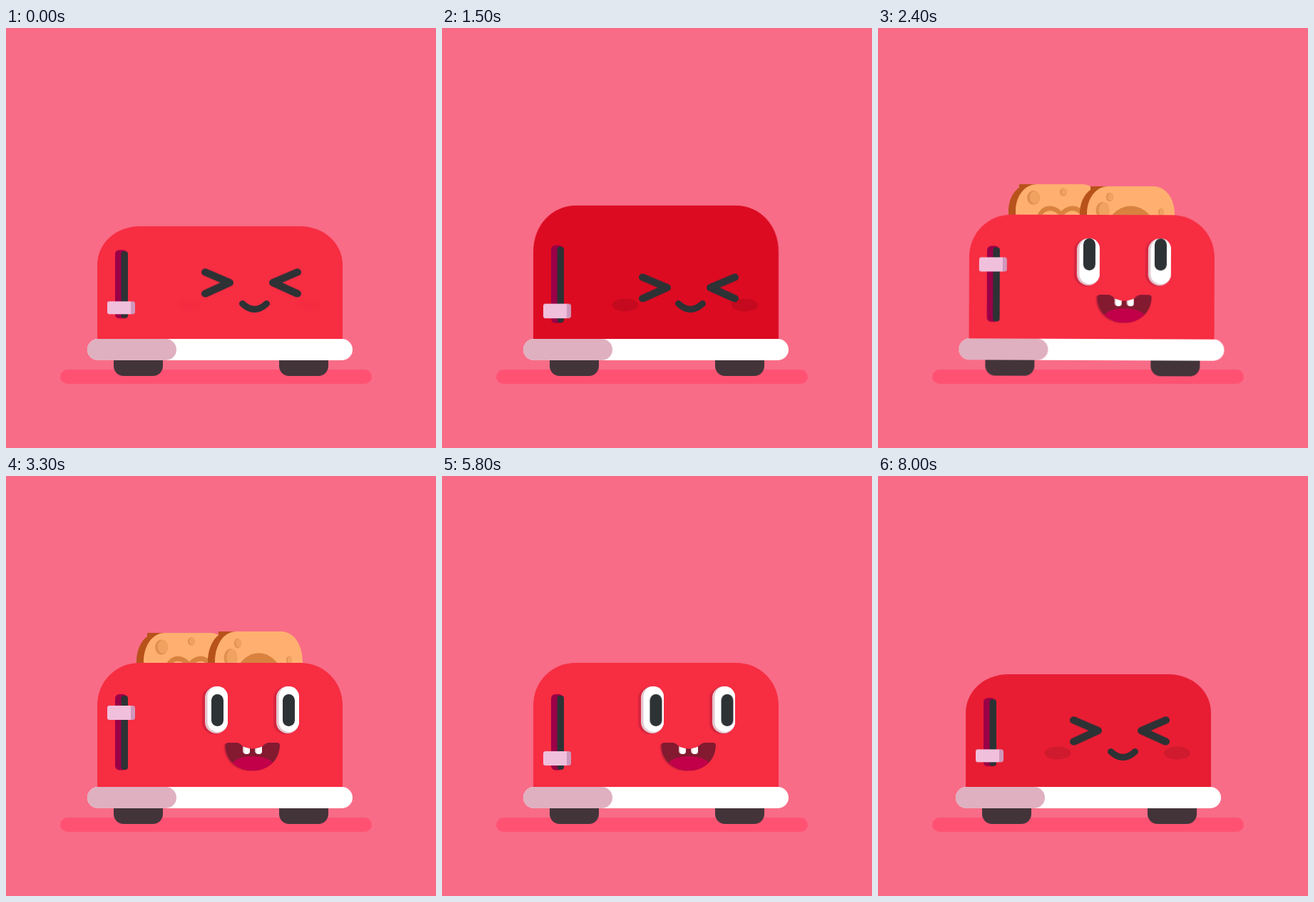
Recreate the animation shown at these times as an HTML page without scripts. Size 603 by 589 pixels, loop 8100 ms.

```html
<!DOCTYPE html>
<html lang="en">
<head>
<meta charset="utf-8">
<title>Happy toaster</title>
<style>
  html, body { margin: 0; width: 100%; height: 100%; overflow: hidden; background: #f86c87; }
  svg { display: block; }

  /* one shared clock: 100 ms = 1.2346 % */
  .rock, .shake, .body, .slot, .lever, .blush, .open, .shut, .squint, .pupils, .back, .front {
    animation: 8.1s linear infinite;
  }
  .ink { fill: #2d3235; }
  .line { fill: none; stroke: #2d3235; stroke-linecap: round; stroke-linejoin: round; }
  .hole { fill: #e08f4e; }
  .pit { fill: #f0a260; }

  .rock { animation-name: rock; transform-origin: 300px 436px; }
  @keyframes rock {
    0%, 20.98% { transform: none; }
    22.22% { transform: translate(1px, -5px) rotate(-1deg); }
    24.69% { transform: translate(2px, -8px) rotate(-2deg); }
    27.16% { transform: translate(0, -1px) rotate(-.3deg); }
    28.4% { transform: translate(-1px, 0) rotate(.8deg); }
    30.86% { transform: translate(0, 0) rotate(-.4deg); }
    33.33%, 100% { transform: none; }
  }

  .shake { animation-name: shake; animation-timing-function: step-end; }
  @keyframes shake {
    0% { transform: none; }
    1.23%, 6.17% { transform: translateX(5px); }
    2.46%, 7.4%, 9.87% { transform: translateX(-2px); }
    3.7%, 11.11% { transform: translateX(4px); }
    4.93% { transform: translateX(-1px); }
    8.64% { transform: translateX(3px); }
    12.34%, 14.81% { transform: translateX(-2px); }
    13.58%, 16.04% { transform: translateX(3px); }
    17.28%, 92.59% { transform: none; }
    93.82%, 96.29% { transform: translateX(5px); }
    95.06% { transform: translateX(-4px); }
    97.53% { transform: translateX(3px); }
    98.76%, 100% { transform: translateX(-5px); }
  }

  .body { animation-name: squash, heat; transform-origin: 300px 436px; fill: #f72d42; }
  @keyframes squash {
    0%, 11.11% { transform: scaleY(.908); animation-timing-function: ease-in-out; }
    18.52%, 19.75% { transform: scaleY(1.075); }
    22.22%, 81.48% { transform: none; }
    82.72% { transform: scaleY(1.034); }
    83.95% { transform: scaleY(1.017); animation-timing-function: ease-out; }
    91.36%, 100% { transform: scaleY(.908); }
  }
  @keyframes heat {
    0% { fill: #f72d42; }
    12.35%, 20.99% { fill: #dc0b22; }
    23.46%, 92.59% { fill: #f72d42; }
    98.77%, 100% { fill: #e81d33; }
  }

  .slot { animation-name: slot; transform-origin: 162px 359.5px; }
  @keyframes slot {
    0%, 11.11% { transform: scaleY(.9); animation-timing-function: ease-in-out; }
    18.52%, 19.75% { transform: scaleY(1.025); }
    22.22%, 81.48% { transform: none; }
    82.72% { transform: scaleY(1.05); }
    83.95% { transform: scaleY(1.025); animation-timing-function: ease-out; }
    91.36%, 100% { transform: scaleY(.9); }
  }

  .lever { animation-name: lever; }
  @keyframes lever {
    0%, 19.75% { transform: translateY(64px); }
    22.22%, 23.46% { transform: translateY(-3px); }
    25.93%, 45.68% { transform: none; animation-timing-function: ease-in-out; }
    56.79% { transform: translateY(62px); }
    59.26%, 100% { transform: translateY(64px); }
  }

  .blush { animation-name: blush; opacity: 0; }
  @keyframes blush {
    0% { opacity: 0; }
    4.94%, 22.22% { opacity: .1; }
    24.69% { opacity: .07; }
    29.63%, 92.59% { opacity: 0; }
    97.53%, 100% { opacity: .1; }
  }

  .open { animation-name: open; animation-timing-function: step-end; }
  .shut { animation-name: shut; animation-timing-function: step-end; }
  @keyframes open {
    0%, 81.48%, 100% { visibility: hidden; }
    20.98% { visibility: visible; }
  }
  @keyframes shut {
    0%, 81.48%, 100% { visibility: visible; }
    20.98% { visibility: hidden; }
  }

  .squint { animation-name: squint; transform-origin: 349px 344.5px; }
  @keyframes squint {
    0%, 11.11% { transform: translate(-5px, 13px) scaleY(.94); }
    18.52%, 20.98% { transform: translate(-3px, 20px) scaleY(.93); }
    81.48% { transform: translate(2px, -12px); }
    83.95% { transform: none; animation-timing-function: ease-out; }
    91.36%, 100% { transform: translate(-5px, 13px) scaleY(.94); }
  }

  .pupils { animation-name: look; }
  @keyframes look {
    0%, 24.69% { transform: none; }
    28.4%, 37.04% { transform: translateY(-11px); animation-timing-function: ease-in-out; }
    40.74%, 61.73% { transform: none; animation-timing-function: ease-in-out; }
    66.67%, 70.37% { transform: translateX(7px); }
    72.84%, 100% { transform: none; }
  }

  .back { animation-name: back; }
  @keyframes back {
    0%, 20.98% { transform: translateY(295px) scaleY(1.18); }
    22.22% { transform: translateY(160px) scaleY(1.15); }
    23.46% { transform: translateY(113px) scaleY(1.06); animation-timing-function: ease-out; }
    24.69% { transform: translateY(94px); animation-timing-function: ease-in; }
    29.63% { transform: translateY(219px) scaleY(1.1); }
    30.86% { transform: translateY(228px) scaleY(1.1); }
    32.1% { transform: translateY(223px) scaleY(1.16); }
    34.57%, 45.68% { transform: translateY(220px) scaleY(1.18); animation-timing-function: ease-in-out; }
    56.79%, 100% { transform: translateY(295px) scaleY(1.18); }
  }

  .front { animation-name: front; }
  @keyframes front {
    0%, 20.98% { transform: translateY(293px) scaleY(1.38); }
    22.22% { transform: translateY(152px) scaleY(1.25); }
    23.46% { transform: translateY(106px) scaleY(1.1); animation-timing-function: ease-out; }
    24.69% { transform: translateY(88px); animation-timing-function: ease-in; }
    29.63% { transform: translateY(222px) scaleY(1.25); }
    30.86% { transform: translateY(225px) scaleY(1.3); }
    33.33%, 45.68% { transform: translateY(218px) scaleY(1.38); animation-timing-function: ease-in-out; }
    56.79%, 100% { transform: translateY(293px) scaleY(1.38); }
  }
</style>
</head>
<body>
<svg width="603" height="589" viewBox="0 0 603 589">
  <defs>
    <path id="slice" d="M30 0H93C111 0 123 14 123 31C123 43 118 52 110 57L113 98Q113 105 106 105H15Q8 105 8 98L11 57C4 52 0 43 0 31C0 14 12 0 30 0Z"/>
    <g id="bread">
      <use href="#slice" x="-10" fill="#b8521b"/>
      <path d="M30 0H20V105H15H5V0Z" fill="#b8521b"/>
      <use href="#slice" fill="#ffb070"/>
    </g>
    <g id="hole">
      <circle class="hole" r="1"/>
      <ellipse class="pit" cx=".2" cy="-.05" rx=".78" ry=".9"/>
    </g>
    <g id="eye">
      <rect x="275" y="296" width="33" height="66" rx="16" fill="#7a1030" opacity=".25"/>
      <rect x="279" y="295" width="32" height="66" rx="16" fill="#e3c6cf"/>
      <rect x="282.5" y="295" width="28.5" height="64" rx="14.2" fill="#fff"/>
    </g>
    <rect id="pupil" class="ink" x="288" y="306" width="17" height="45" rx="8.5"/>
    <path id="mouth" d="M312 374H322C327 374 329 376 332 379C340 383.500 352 383.500 360 379C363 376 365 374 370 374H380Q384 374 384 378C383 400 367 413 346 413C325 413 308 400 307.500 378Q307.500 374 312 374Z"/>
    <clipPath id="lips"><use href="#mouth"/></clipPath>
  </defs>

  <rect width="603" height="589" fill="#f86c87"/>
  <rect x="76" y="479" width="437" height="20" rx="10" fill="#ff5273"/>

  <g transform="translate(193 0)">
    <g class="back">
      <use href="#bread" transform="scale(1 1.114)"/>
      <path d="M64 39C57 30 45 28 37 35C30 42 30 53 36 61Q42 68 64 78Q86 68 92 61C98 53 98 42 91 35C83 28 71 30 64 39Z" fill="none" stroke="#d9823f" stroke-width="6"/>
      <use href="#hole" transform="translate(25 17) scale(9)"/>
      <use href="#hole" transform="translate(67 10) scale(5)"/>
      <use href="#hole" transform="translate(59 62) scale(7)"/>
      <use href="#hole" transform="translate(82 49) scale(4)"/>
      <use href="#hole" transform="translate(30 94) scale(4)"/>
      <use href="#hole" transform="translate(98 91) scale(5.500)"/>
    </g>
  </g>
  <g transform="translate(293 0)">
    <g class="front">
      <use href="#bread"/>
      <use href="#hole" transform="translate(22 27) scale(9.500)"/>
      <use href="#hole" transform="translate(32 12) scale(5)"/>
      <use href="#hole" transform="translate(104 29) scale(4)"/>
      <ellipse cx="61.500" cy="55.500" rx="36.500" ry="33.500" fill="#d9823f"/>
    </g>
  </g>

  <g class="rock"><g class="shake">
    <g fill="#43343a">
      <rect x="151" y="450" width="69" height="38" rx="14"/>
      <rect x="383" y="450" width="69" height="38" rx="14"/>
    </g>
    <path class="body" d="M128 437V322C128 288 154 262 188 262H412C446 262 472 288 472 322V437Z"/>
    <rect x="114" y="436" width="372" height="30" rx="15" fill="#fff"/>
    <rect x="114" y="436" width="125" height="30" rx="15" fill="#dfb0c0"/>

    <g class="slot">
      <rect x="153" y="306" width="17" height="106.500" rx="6" fill="#9b0047"/>
      <rect class="ink" x="161.500" y="308" width="9.500" height="104" rx="4"/>
      <g class="lever">
        <rect x="142" y="322" width="39" height="20" rx="3.500" fill="#cf97bb"/>
        <path d="M145.500 322H175V342H145.500Q142 342 142 338.500V325.500Q142 322 145.500 322Z" fill="#f0bfdc"/>
      </g>
    </g>

    <g class="blush">
      <ellipse cx="257" cy="388.500" rx="18.500" ry="9"/>
      <ellipse cx="424.500" cy="388.500" rx="18.500" ry="9"/>
    </g>

    <g class="open">
      <use href="#eye"/>
      <use href="#eye" x="100"/>
      <g class="pupils">
        <use href="#pupil"/>
        <use href="#pupil" x="100"/>
      </g>
      <use href="#mouth" x="-2" y="1" fill="#7a1030" opacity=".3"/>
      <use href="#mouth" fill="#831a30"/>
      <g clip-path="url(#lips)">
        <ellipse cx="346" cy="407" rx="30" ry="14" fill="#c2004a"/>
        <g fill="#e3c6cf">
          <rect x="332" y="374" width="10" height="16" rx="4.500"/>
          <rect x="349" y="374" width="10" height="16" rx="4.500"/>
        </g>
        <g fill="#fff">
          <rect x="334" y="374" width="8" height="16" rx="4"/>
          <rect x="351" y="374" width="8" height="16" rx="4"/>
        </g>
      </g>
    </g>

    <g class="shut">
      <g class="squint line" stroke-width="11">
        <path d="M284.500 328.500L318.500 344L284.500 360.500"/>
        <path d="M413.500 328.500L379.500 344L413.500 360.500"/>
      </g>
      <path class="line" stroke-width="9" d="M331.500 386.500Q348.500 402.500 365.500 386.500"/>
    </g>
  </g></g>
</svg>
</body>
</html>
```
